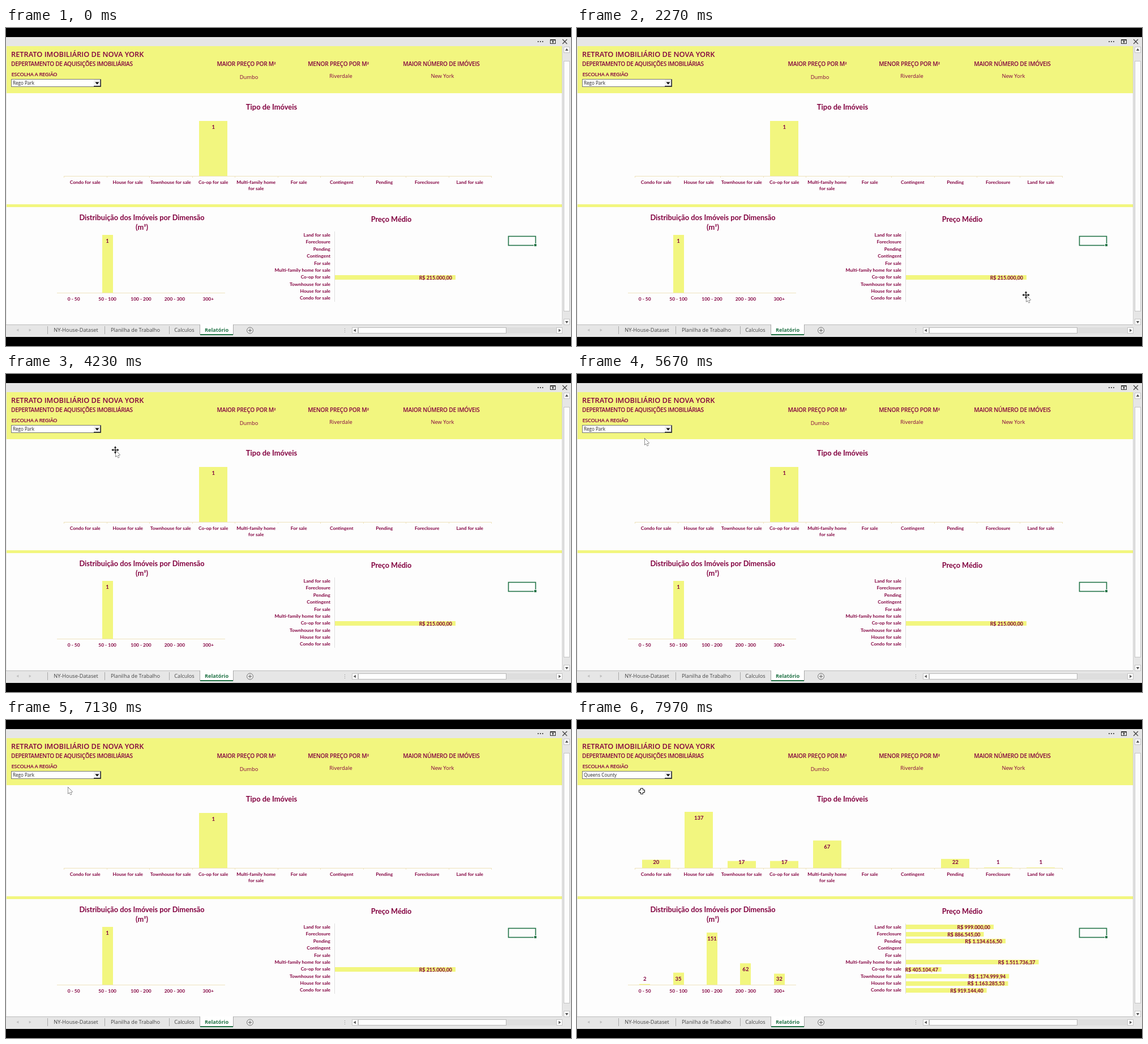
An HTML page with a canvas for the animation above (8 s loop, 998x561 px).

```html
<!DOCTYPE html>
<html lang="pt">
<head>
<meta charset="utf-8">
<title>Retrato Imobiliário</title>
<style>
html, body { margin: 0; width: 100%; height: 100%; overflow: hidden; background: #000; }
canvas { display: block; }
</style>
</head>
<body>
<canvas id="stage" width="998" height="561"></canvas>
<script>
const ctx = document.getElementById('stage').getContext('2d');
const LOOP = 8000;
const SELECT_AT = 7200;
const YELLOW = '#f2f67f', WINE = '#82003f', GREY = '#e6e6e6', GREEN = '#217346', AXIS = '#eee2bd';
const UI = '"Open Sans", "Noto Sans", sans-serif';
const CHART = 'Lato, sans-serif';

const TYPES = ['Condo for sale', 'House for sale', 'Townhouse for sale', 'Co-op for sale',
  'Multi-family home|for sale', 'For sale', 'Contingent', 'Pending', 'Foreclosure', 'Land for sale'];
const SIZES = ['0 - 50', '50 - 100', '100 - 200', '200 - 300', '300+'];

const REGIONS = {
  before: {
    name: 'Rego Park',
    types: [0, 0, 0, 1, 0, 0, 0, 0, 0, 0], typeScale: 97,
    sizes: [0, 1, 0, 0, 0], sizeScale: 102,
    prices: [0, 0, 0, 215000, 0, 0, 0, 0, 0, 0], priceScale: 213 / 215000
  },
  after: {
    name: 'Queens County',
    types: [20, 137, 17, 17, 67, 0, 0, 22, 1, 1], typeScale: 99 / 137,
    sizes: [2, 35, 151, 62, 32], sizeScale: 92 / 151,
    prices: [919144.4, 1163285.53, 1174999.94, 405104.47, 1511736.37, 0, 0, 1134616.5, 886545, 999000],
    priceScale: 234.5 / 1511736.37
  }
};

// Pointer stops: time, x, y
const PATH = [
  [2100, 874, 540], [2260, 793, 471], [3800, 793, 471], [4230, 193, 134],
  [4650, 163, 98], [5350, 163, 98], [5650, 119, 113], [6200, 119, 113],
  [6800, 109, 118], [7150, 109, 118], [7330, 116, 126], [7600, 116, 126], [7750, 114, 125]
];

function rect(x, y, w, h, color) {
  ctx.fillStyle = color;
  ctx.fillRect(x, y, w, h);
}

function frame(x, y, w, h, color) {
  ctx.strokeStyle = color;
  ctx.lineWidth = 1;
  ctx.strokeRect(x + 0.5, y + 0.5, w - 1, h - 1);
}

function line(color, width, ...points) {
  ctx.strokeStyle = color;
  ctx.lineWidth = width;
  ctx.beginPath();
  points.forEach(([x, y]) => ctx.lineTo(x, y));
  ctx.stroke();
}

function polygon(points, fill, stroke) {
  ctx.beginPath();
  points.forEach(([x, y]) => ctx.lineTo(x, y));
  ctx.closePath();
  if (stroke) {
    ctx.strokeStyle = stroke;
    ctx.lineWidth = 1;
    ctx.stroke();
  }
  ctx.fillStyle = fill;
  ctx.fill();
}

// y is the middle of the capital letters
function text(str, x, y, size, opt = {}) {
  const { family = UI, weight = 400, color = WINE, align = 'left', spacing = 0 } = opt;
  ctx.font = `${weight} ${size}px ${family}`;
  ctx.letterSpacing = spacing + 'px';
  ctx.textAlign = align;
  ctx.fillStyle = color;
  ctx.fillText(str, x, y + size * 0.357);
}

function label(str, x, y, size, align = 'center') {
  text(str, x, y, size, { family: CHART, weight: 700, align });
}

function triangle(x, y, dx, dy, r, color) {
  polygon([[x + dx * r, y + dy * r], [x - dy * r - dx * r / 2, y + dx * r - dy * r / 2],
    [x + dy * r - dx * r / 2, y - dx * r - dy * r / 2]], color);
}

function money(value) {
  const [whole, cents] = value.toFixed(2).split('.');
  return 'R$ ' + whole.replace(/\B(?=(\d{3})+$)/g, '.') + ',' + cents;
}

function drawWindow() {
  rect(0, 0, 998, 561, '#000');
  rect(0, 16, 998, 529, GREY);
  rect(1, 32, 981, 491, '#fdfdfd');
  rect(1, 32, 981, 83, YELLOW);
  rect(1, 311, 981, 5, YELLOW);

  for (let i = 0; i < 3; i++) rect(939 + i * 4, 23, 2, 2, '#555');
  frame(961, 20, 10, 8, '#333');
  rect(961, 20, 10, 2, '#333');
  line('#333', 1, [966, 27], [966, 23]);
  triangle(966, 24, 0, -1, 2, '#333');
  line('#444', 1.2, [983, 20], [991, 28]);
  line('#444', 1.2, [991, 20], [983, 28]);
}

function drawScrollButton(x, y, w, h, dx, dy) {
  rect(x, y, w, h, '#fdfdfd');
  frame(x, y, w, h, '#c4c4c4');
  triangle(x + w / 2, y + h / 2, dx, dy, 2.8, '#555');
}

function drawScrollbars() {
  rect(982, 32, 16, 491, GREY);
  rect(982, 32, 1, 491, '#cfcfcf');
  drawScrollButton(985, 33, 11, 11, 0, -1);
  drawScrollButton(985, 513, 11, 11, 0, 1);
  rect(985, 58, 11, 442, '#fdfdfd');
  frame(985, 58, 11, 442, '#c4c4c4');

  rect(611, 528, 372, 11, '#dedede');
  drawScrollButton(611, 528, 11, 11, -1, 0);
  drawScrollButton(972, 528, 11, 11, 1, 0);
  rect(622, 528, 262, 11, '#fdfdfd');
  frame(622, 528, 262, 11, '#b8b8b8');
  for (let i = 0; i < 3; i++) rect(598, 530 + i * 3, 1, 1, '#888');
}

function drawTabs() {
  rect(0, 523, 982, 1, '#bcbcbc');
  triangle(21, 533, -1, 0, 2.6, '#c0c0c0');
  triangle(42, 533, 1, 0, 2.6, '#c0c0c0');
  [73, 174, 288].forEach(x => rect(x, 526, 1, 14, '#a8a8a8'));
  const tab = { color: '#444', align: 'center' };
  text('NY-House-Dataset', 123.5, 533, 9.2, tab);
  text('Planilha de Trabalho', 228.5, 533, 9.2, tab);
  text('Calculos', 315, 533, 9.2, tab);
  rect(343, 523, 58, 18, '#fff');
  rect(342, 523, 1, 18, '#a8a8a8');
  rect(401, 523, 1, 18, '#a8a8a8');
  rect(343, 540, 58, 2, GREEN);
  text('Relatório', 372, 533, 9.2, { color: GREEN, weight: 700, align: 'center' });
  ctx.strokeStyle = '#777';
  ctx.lineWidth = 1;
  ctx.beginPath();
  ctx.arc(431, 533.5, 5.5, 0, Math.PI * 2);
  ctx.stroke();
  line('#666', 1, [428, 533.5], [434, 533.5]);
  line('#666', 1, [431, 530.5], [431, 536.5]);
}

function drawHeader(region) {
  text('RETRATO IMOBILIÁRIO DE NOVA YORK', 9, 46.5, 12.8, { weight: 600 });
  text('DEPERTAMENTO DE AQUISIÇÕES IMOBILIÁRIAS', 9, 63, 10.2, { weight: 600, spacing: -0.35 });
  text('ESCOLHA A REGIÃO', 9.5, 82, 9.4, { weight: 600, spacing: -0.4 });

  const kpis = [['MAIOR PREÇO POR M²', 'Dumbo', 424.5, 429, 86.5],
    ['MENOR PREÇO POR M²', 'Riverdale', 587, 591.5, 85],
    ['MAIOR NÚMERO DE IMÓVEIS', 'New York', 769, 771, 84.5]];
  kpis.forEach(([title, value, titleX, valueX, y]) => {
    text(title, titleX, 63, 10.2, { weight: 600, spacing: -0.25, align: 'center' });
    text(value, valueX, y, 9.4, { align: 'center' });
  });

  rect(9, 90, 159, 14, '#fff');
  frame(9, 90, 159, 14, '#777');
  rect(155, 91, 12, 12, '#f0f0f0');
  line('#222', 1.4, [155, 102.8], [167, 102.8], [167, 91]);
  polygon([[157.5, 95.5], [164.5, 95.5], [161, 99.5]], '#000');
  text(region.name, 12, 97.5, 8.1, { color: '#222' });
}

function drawColumns(values, names, chart) {
  const { left, right, base, scale, width, labelLow, nameY, ticks } = chart;
  const step = (right - left) / values.length;
  rect(left, base, right - left, 1, AXIS);
  for (let i = 0; ticks && i <= values.length; i++) rect(Math.round(left + i * step), base, 1, 3, AXIS);
  values.forEach((value, i) => {
    const x = left + (i + 0.5) * step;
    names[i].split('|').forEach((part, row) => label(part, x, nameY + row * 11, 8.4));
    if (!value) return;
    const top = base - value * scale;
    rect(Math.round(x - width / 2), top, width, base - top, YELLOW);
    label(String(value), x, Math.min(top + 10.8, labelLow), 9.6);
  });
}

function drawPrices(region) {
  label('Preço Médio', 680.5, 337, 12.7);
  rect(580, 359, 1, 124, '#dedede');
  TYPES.forEach((name, i) => {
    const y = 476.5 - i * 12.38;
    label(name.replace('|', ' '), 573, y, 8.4, 'right');
    const value = region.prices[i];
    if (!value) return;
    const width = value * region.priceScale;
    rect(581, Math.round(y - 3.6), width, 8, YELLOW);
    label(money(value), 581 + width - 6, y + 1, 8.9, 'right');
  });
}

function drawCharts(region) {
  label('Tipo de Imóveis', 469, 139.5, 12.9);
  drawColumns(region.types, TYPES, {
    left: 102, right: 857, base: 261, scale: region.typeScale, width: 50,
    labelLow: 251, nameY: 272, ticks: true
  });
  label('Distribuição dos Imóveis por Dimensão', 240, 334.5, 12.75);
  label('(m²)', 240, 351.5, 12.75);
  drawColumns(region.sizes, SIZES, {
    left: 90, right: 387, base: 467, scale: region.sizeScale, width: 19,
    labelLow: 457, nameY: 478, ticks: false
  });
  drawPrices(region);

  ctx.strokeStyle = GREEN;
  ctx.lineWidth = 1.6;
  ctx.strokeRect(887.5, 367.5, 48, 16);
  rect(932, 380, 5, 5, '#fdfdfd');
  rect(933, 381, 4, 4, GREEN);
}

function drawArrow(x, y) {
  polygon([[0, 0], [0, 11.5], [2.6, 9.2], [4.4, 13.4], [6.2, 12.6], [4.4, 8.6], [7.8, 8.4]]
    .map(([px, py]) => [x + px + 0.5, y + py + 0.5]), '#fff', '#222');
}

function drawMove(x, y) {
  drawArrow(x, y);
  line('#111', 1.2, [x - 5, y], [x + 5, y]);
  line('#111', 1.2, [x, y - 5], [x, y + 5]);
  [[1, 0], [-1, 0], [0, 1], [0, -1]].forEach(([dx, dy]) =>
    triangle(x + dx * 4.5, y + dy * 4.5, dx, dy, 2.2, '#111'));
}

function drawPlus(x, y) {
  rect(x - 2.5, y - 5.5, 5, 11, '#111');
  rect(x - 5.5, y - 2.5, 11, 5, '#111');
  rect(x - 1.5, y - 4.5, 3, 9, '#fff');
  rect(x - 4.5, y - 1.5, 9, 3, '#fff');
}

function pointerAt(t) {
  const next = PATH.findIndex(stop => stop[0] > t);
  if (next < 0) return PATH[PATH.length - 1].slice(1);
  const [t0, x0, y0] = PATH[next - 1], [t1, x1, y1] = PATH[next];
  const p = (t - t0) / (t1 - t0);
  const eased = p * p * (3 - 2 * p);
  return [x0 + (x1 - x0) * eased, y0 + (y1 - y0) * eased];
}

function drawPointer(t) {
  if (t < PATH[0][0]) return;
  const [x, y] = pointerAt(t).map(Math.round);
  const overList = t > 4650 && t < SELECT_AT;
  if (t > 7680) drawPlus(x + 0.5, y + 0.5);
  else if (overList || y < 115 || y > 522) drawArrow(x, y);
  else drawMove(x, y);
}

function render(now) {
  const t = now % LOOP;
  const region = t < SELECT_AT ? REGIONS.before : REGIONS.after;
  drawWindow();
  drawHeader(region);
  drawCharts(region);
  drawScrollbars();
  drawTabs();
  drawPointer(t);
  rect(0, 545, 998, 16, '#000');
}

const start = performance.now();
function tick() {
  render(performance.now() - start);
  requestAnimationFrame(tick);
}
tick();
</script>
</body>
</html>
```
